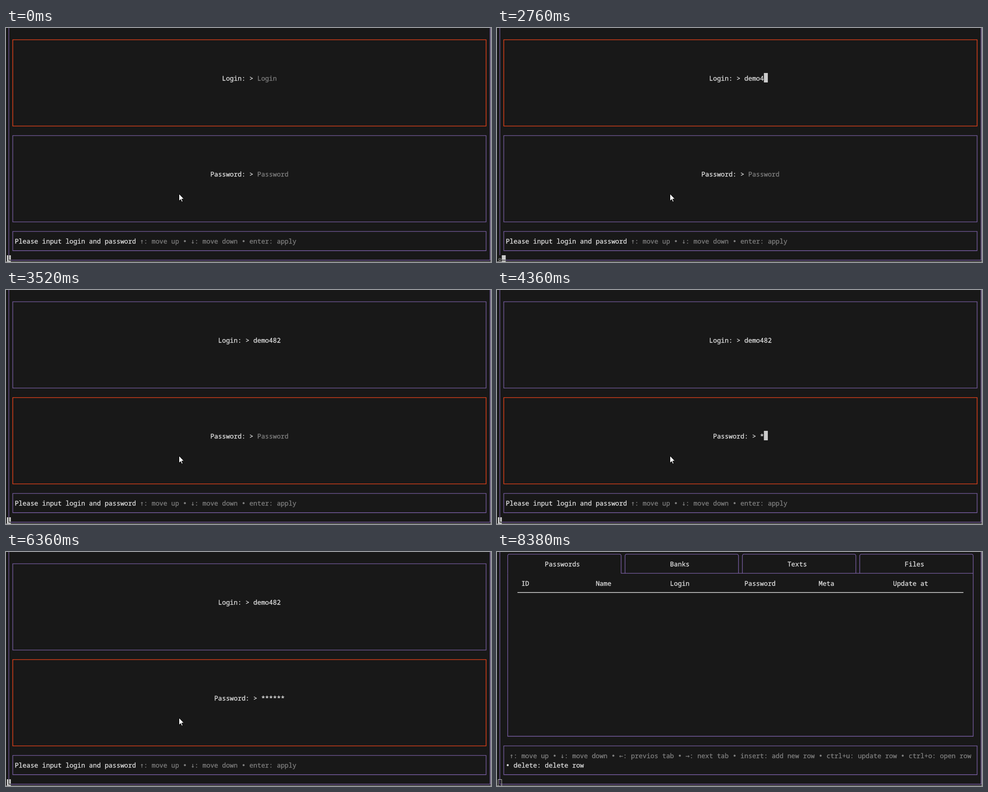
These frames come from a looping animation (1078 px wide and 520 px high, 8.4 s). An HTML page:

```html
<!DOCTYPE html>
<html lang="en">
<head>
<meta charset="utf-8">
<title>Terminal login</title>
<style>
  html, body { margin: 0; width: 100%; height: 100%; overflow: hidden; background: #181818; }
  svg { display: block; }
  text {
    font: 14.49px "Noto Sans Mono", "DejaVu Sans Mono", monospace;
    text-rendering: geometricPrecision;
    white-space: pre;
    stroke-width: 0.3px;
  }
  .sign { font-family: "DejaVu Sans Mono", monospace; }
</style>
</head>
<body>
<svg width="1078" height="520" viewBox="0 0 1078 520">
  <g id="screen"></g>
  <path id="mouse" d="M.5.5V16.5L4.2 13 6.7 18.5 9 17.5 6.6 12H11.5Z" fill="#fff" stroke="#000"/>
</svg>
<script>
const LOOP = 8400;
const BG = "#181818", FG = "#e2e2e2", DIM = "#818181", BLOCK = "#cccccc", EDGE = "#a4a4a4";
const PURPLE = "#7b60a6", RED = "#f8461a";
const CELL = 8.695, ROW = 21.3;
const USER = "demo482";

// Rows are counted upwards from the bottom border, columns from the left one.
const left = col => 2 + CELL * col;
const midX = col => left(col + 0.5);
const midY = row => 516 - ROW * row;

const rect = (x, y, w, h, fill) =>
  `<rect x="${x}" y="${y}" width="${w}" height="${h}" fill="${fill}"/>`;

const stroke = (d, color) =>
  `<path d="${d}" fill="none" stroke="${color}" stroke-width="1.35"/>`;

const frame = (c0, c1, r0, r1, color) =>
  stroke(`M${midX(c0)} ${midY(r0)}H${midX(c1)}V${midY(r1)}H${midX(c0)}Z`, color);

// Each word or sign is placed on its own grid column.
function text(col, row, str, color = FG) {
  const y = Math.round(midY(row) + 6);
  return [...str.matchAll(/[↑↓←→•]|[^\s↑↓←→•]+/g)].map(({ 0: word, index }) => {
    const kind = /[↑↓←→•]/.test(word) ? ' class="sign"' : "";
    return `<text${kind} x="${left(col + index).toFixed(2)}" y="${y}" fill="${color}" stroke="${color}">` +
      `${word.replace(/>/g, "&gt;")}</text>`;
  }).join("");
}

function field(row, label, value, caret) {
  const prompt = label + ": > ";
  const len = prompt.length + (value || label).length + (caret ? 1 : 0);
  const col = 2 + Math.floor((120 - len) / 2);
  let out = text(col, row, prompt) +
    text(col + prompt.length, row, value || label, value ? FG : DIM);
  if (caret === "on") {
    out += rect(left(col + len - 1), Math.round(midY(row) - 11), CELL, 21, BLOCK);
  }
  return out;
}

function border(echo, blurred) {
  const right = midX(123);
  let out = stroke(`M${midX(0)} 0V516H${right}V0`, PURPLE) +
    rect(0, 519, 1078, 1, EDGE) + rect(1077, 0, 1, 520, EDGE);
  if (echo) {
    return out + rect(2, 505, 9, 14, BG) + text(0, 0, echo, DIM) +
      rect(left(1), 505, CELL, 14, BLOCK) + rect(left(1), 515.3, CELL, 1.35, BG);
  }
  if (blurred) return out + `<path d="M2.5 520V505.5H10.5V520" fill="none" stroke="${BLOCK}"/>`;
  return out + rect(2, 505, CELL, 14, BLOCK) + stroke(`M${midX(0)} 505V516H11`, BG);
}

function loginScreen(s) {
  const onLogin = s.focus === "login";
  return border(s.echo) +
    frame(1, 122, 23, 14, onLogin ? RED : PURPLE) +
    frame(1, 122, 13, 4, onLogin ? PURPLE : RED) +
    frame(1, 122, 3, 1, PURPLE) +
    field(19, "Login", USER.slice(0, s.user), onLogin && s.caret) +
    field(9, "Password", "*".repeat(s.pass), !onLogin && s.caret) +
    text(2, 2, "Please input login and password") +
    text(34, 2, "↑: move up • ↓: move down • enter: apply", DIM);
}

function tableScreen(s) {
  const top = midY(24), base = midY(22), end = midY(5);
  const tabs = [["Passwords", 12], ["Banks", 44], ["Texts", 74], ["Files", 104]];
  const heads = ["ID", "Name", "Login", "Password", "Meta", "Update at"];
  let out = border("", s.blurred);
  tabs.forEach(([name, col], i) => {
    const a = midX(2 + 30 * i), b = midX(31 + 30 * i);
    out += stroke(`M${a} ${base}V${top + 4}q0-4 4-4H${b - 4}q4 0 4 4V${base}`, PURPLE) +
      text(col, 23, name);
  });
  out += stroke(`M${midX(31)} ${base}H${midX(121)}V${end}H${midX(2)}V${base}`, PURPLE);
  heads.forEach((name, i) => { out += text(6 + 19 * i, 21, name); });
  return out + stroke(`M${left(5)} ${midY(20)}H${left(119)}`, FG) +
    frame(1, 122, 4, 1, PURPLE) +
    text(3, 3, "↑: move up • ↓: move down • ←: previos tab • →: next tab • insert: add new row • ctrl+u: update row • ctrl+o: open row", DIM) +
    text(2, 2, "• delete: delete row");
}

// Each step changes only the listed parts of the state.
const steps = [
  [0, { view: loginScreen, focus: "login", user: 0, pass: 0, caret: "", echo: "" }],
  [1840, { user: 1, caret: "on", echo: USER[1] }],
  [1960, { user: 2, echo: USER[2] }],
  [2080, { user: 3, echo: USER[3] }],
  [2230, { user: 4, echo: "" }],
  [2760, { user: 5, echo: USER[5] }],
  [2880, { user: 6, echo: USER[6] }],
  [3030, { user: 7, echo: "" }],
  [3400, { caret: "" }],
  [3520, { focus: "password" }],
  [4360, { pass: 1, caret: "on" }],
  [4510, { pass: 2 }],
  [4630, { pass: 3 }],
  [5280, { caret: "off" }],
  [5560, { pass: 4, caret: "on", echo: "5" }],
  [5680, { pass: 5, echo: "6" }],
  [5830, { pass: 6, echo: "" }],
  [6360, { caret: "" }],
  [6660, { view: tableScreen }],
  [8380, { blurred: true }]
];
let acc = {};
const states = steps.map(([at, change]) => [at, acc = { ...acc, ...change }]);

const mousePath = [
  [0, [384, 368]], [7500, [469, 374]], [7650, [567, 334]],
  [7800, [594, 324]], [7950, [600, 317]], [8070, null]
];

const at = (table, t) => table.findLast(([start]) => start <= t)[1];
const screenEl = document.getElementById("screen");
const mouseEl = document.getElementById("mouse");
let shown;

function draw() {
  const t = performance.now() % LOOP;
  const state = at(states, t), pos = at(mousePath, t);
  if (state !== shown) {
    screenEl.innerHTML = state.view(state);
    shown = state;
  }
  mouseEl.style.display = pos ? "" : "none";
  if (pos) mouseEl.setAttribute("transform", `translate(${pos})`);
  requestAnimationFrame(draw);
}
draw();
</script>
</body>
</html>
```
